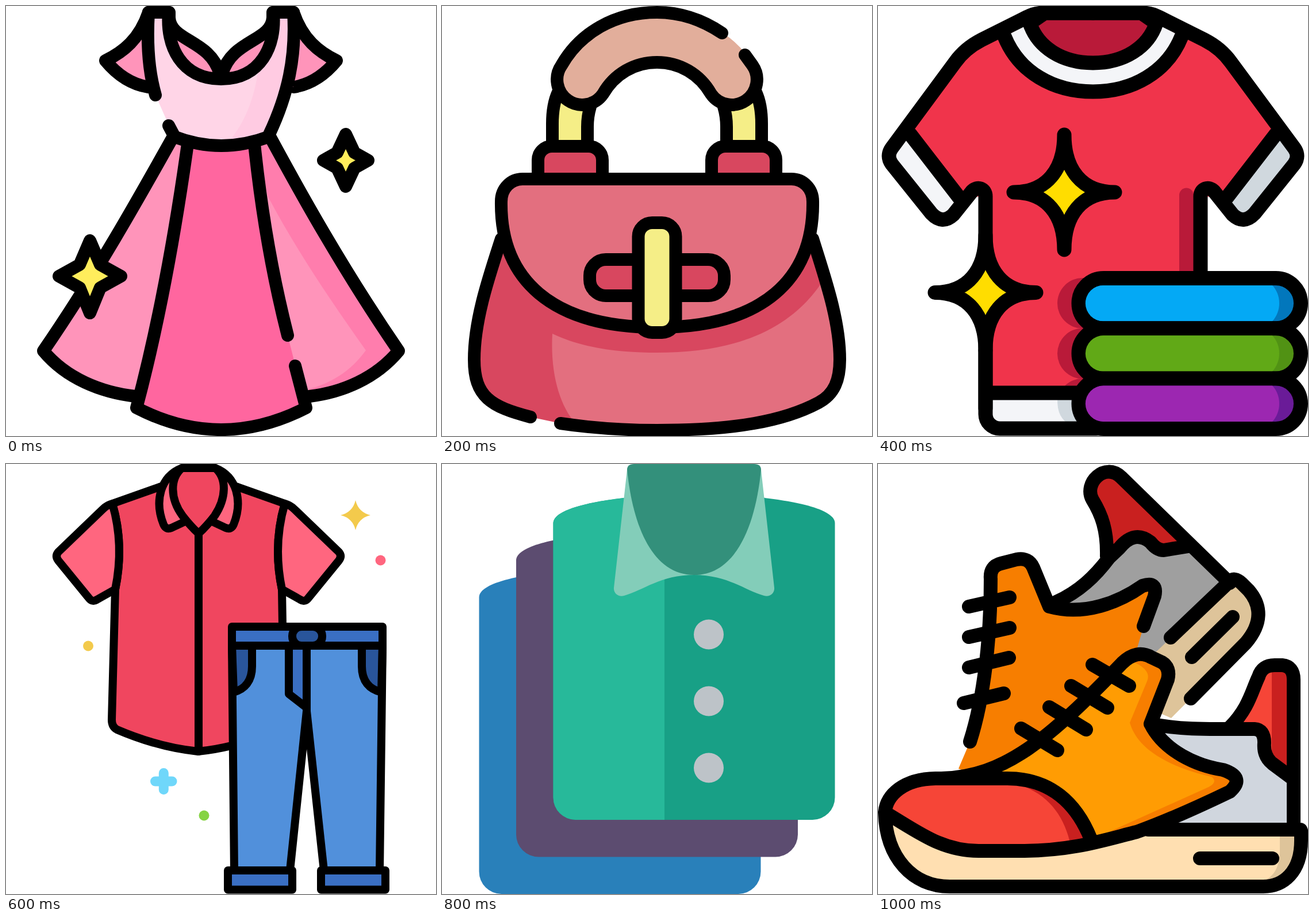
Animation of 748x748 px, one loop 1.2 s. Source, as an HTML page:

```html
<!DOCTYPE html>
<html lang="en">
<head>
<meta charset="utf-8">
<title>Wardrobe</title>
<style>
  html, body { margin: 0; width: 100%; height: 100%; overflow: hidden; background: #fff; }
  svg { display: block; width: 100vw; height: 100vh; fill: none; stroke: #000; stroke-linecap: round; stroke-linejoin: round; }
  .scene { display: none; }
  .flat { stroke: none; }
</style>
</head>
<body>
<svg viewBox="0 0 748 748">
  <!-- dress -->
  <g class="scene" stroke-width="22">
    <g class="flat">
      <path fill="#ff94ba" d="M292 225C236 325 161 460 65 600C105 648 165 672 225 679L316 240Z"/>
      <path fill="#ff7dad" d="M458 225C512 325 587 460 683 600C643 648 585 672 528 679L432 240Z"/>
      <path fill="#ff94ba" d="M432 240L456 332C505 425 570 520 626 599C600 635 565 657 524 667L494 600Z"/>
      <path fill="#ff669f" d="M316 240C295 390 268 545 227 699Q374 775 522 699L490 573C465 475 445 365 432 240Z"/>
      <path fill="#ffd5e7" d="M248 11C245 60 247 110 260 155L292 227Q374 259 458 227C490 155 505 90 500 11H465C470 70 443 127 374 127S278 70 283 11Z"/>
      <path fill="#ffcbe2" d="M439 110C432 160 417 200 388 236L458 227C490 155 505 90 500 11H465C468 55 455 90 439 110Z"/>
    </g>
    <g id="sleeve">
      <path fill="#ff94ba" d="M248 11C232 58 204 80 173 95C192 118 217 136 247 141"/>
      <path fill="#ff94ba" class="flat" d="M248 11V141L257 141C247 100 246 60 248 11ZM284 20C286 62 355 58 372 118L374 127C305 127 278 70 284 20Z"/>
      <path d="M248 11H284V20C286 62 355 58 372 118"/>
    </g>
    <use href="#sleeve" transform="matrix(-1 0 0 1 748 0)"/>
    <path d="M248 11C245 60 247 110 260 155M283 208L292 225M500 11C505 90 490 155 458 223
      M283 11C278 70 305 127 374 127S470 70 465 11M292 227Q374 259 458 227
      M292 225C236 325 161 460 65 600C105 648 165 672 225 679M458 225C512 325 587 460 683 600C643 648 585 672 528 679
      M316 240C295 390 268 545 227 699Q374 775 522 699L503 626M432 240C445 365 465 475 490 573"/>
    <path fill="#ffed5c" d="M146 408L164 450L200 470L164 490L146 534L128 490L92 470L128 450Z"/>
    <path fill="#ffed5c" d="M591 223L606 255L630 268.500L606 282L591 314L576 282L552 268.500L576 255Z"/>
  </g>

  <!-- handbag -->
  <g class="scene" stroke-width="22">
    <g class="flat">
      <path fill="#d8475f" d="M103 405C82 470 56 545 56 615C56 680 85 697 154 715L206 726C260 734 320 738 374 738C510 738 595 722 655 690C683 675 692 650 692 615C692 545 665 470 645 405Z"/>
      <path fill="#e36f7f" d="M192 570C250 598 320 603 374 603C500 603 600 570 660 482C680 540 692 580 692 615C692 650 683 675 655 690C595 722 510 738 374 738C320 738 275 734 232 726C205 695 188 640 192 570Z"/>
    </g>
    <path d="M103 405C82 470 56 545 56 615C56 680 85 697 154 715M206 726C260 734 320 738 374 738C510 738 595 722 655 690C683 675 692 650 692 615C692 545 665 470 645 405"/>
    <g id="post">
      <path class="flat" fill="#f5ee87" d="M192 244V205C192 183 195 165 202 150L258 175C255 185 253 195 253 210V244Z"/>
      <path d="M192 244V205C192 183 195 165 202 150M258 175C255 185 253 195 253 210V244"/>
      <path fill="#d8475f" d="M167 301V268a24 24 0 0 1 24-24H255a24 24 0 0 1 24 24V301"/>
    </g>
    <use href="#post" transform="matrix(-1 0 0 1 748 0)"/>
    <path class="flat" fill="#e2ae9b" d="M488 47C450 22 412 11 374 11C300 11 240 47 208 103A43 43 0 1 0 280 153C300 118 335 98 374 98S448 118 468 153A43 43 0 1 0 540 103L528 83Q511 61 488 47Z"/>
    <path d="M487 47C450 22 412 11 374 11C300 11 240 47 208 103A43 43 0 1 0 280 153C300 118 335 98 374 98S448 118 468 153A43 43 0 1 0 540 103L527 85"/>
    <path fill="#e36f7f" d="M140 301H608C628 301 645 317 645 340C647 475 558 559 374 559S101 475 103 340C103 317 120 301 140 301Z"/>
    <rect x="257" y="441" width="234" height="63" rx="28" fill="#d8475f"/>
    <rect x="341.500" y="377" width="65" height="191" rx="24" fill="#f5ee87"/>
  </g>

  <!-- folded laundry -->
  <g class="scene" stroke-width="25">
    <path class="flat" fill="#f0344b" d="M290 12H458L568 60L614 101L692 223L607 333L561 331V735H187V331L141 333L56 223L134 101L180 60Z"/>
    <g class="flat" fill="#b91a39">
      <path d="M524 480V329a12.500 12.500 0 0 1 25 0V480Z"/>
      <circle cx="356" cy="517" r="44"/><circle cx="356" cy="604.500" r="44"/><circle cx="356" cy="692" r="44"/>
    </g>
    <path class="flat" fill="#f4f5f8" d="M187 673H380V735H210Q187 735 187 712Z"/>
    <path class="flat" fill="#d0d8de" d="M313 673Q308 712 330 726H380V673Z"/>
    <path d="M187 673H380M187 600V710a25 25 0 0 0 25 25H380"/>
    <path class="flat" fill="#f4f5f8" d="M220 53C245 115 305 149 374 149S503 115 528 53L484 30H264Z"/>
    <path fill="#b91a39" d="M264 30C278 72 320 99 374 99S470 72 484 30L458 12H290Z"/>
    <path d="M220 53C245 115 305 149 374 149S503 115 528 53"/>
    <path fill="#f4f5f8" d="M56 223L24 247Q14 261 24 275L93 361Q112 381 131 363L141 333Z" class="flat"/>
    <path fill="#d0d8de" d="M692 223L724 247Q734 261 724 275L655 361Q636 381 617 363L607 333Z" class="flat"/>
    <path id="side" d="M374 12H290C270 12 262 18 250 24L180 59Q151 74 134 98L24 247Q14 261 24 275L93 361Q112 381 131 363L163 323C173 312 187 318 187 331V460M56 223L141 333"/>
    <use href="#side" transform="matrix(-1 0 0 1 748 0)"/>
    <path d="M187 460V700"/>
    <path id="spark" fill="#fd0" d="M324 224C324 285 355 324 412 324C355 324 324 363 324 424C324 363 293 324 236 324C293 324 324 285 324 224Z"/>
    <use href="#spark" x="-137" y="174.500"/>
    <g id="towels"></g>
  </g>

  <!-- shirt and jeans -->
  <g class="scene" stroke-width="14">
    <path fill="#f0465f" d="M185 69L267 40L335 20L403 40L485 69C470 120 470 170 480 218L484 470L392 490Q364 497 334 500C285 495 235 480 193 462Q184 457 184 445L190 218C200 170 200 120 185 69Z"/>
    <g id="arm">
      <path fill="#ff667f" d="M190 218L158 236Q150 241 144 233L91 168Q85 160 91 153L168 79Q176 71 185 69C200 120 200 170 190 218Z"/>
      <path fill="#ff667f" d="M306 7C268 22 258 65 274 105Q278 115 288 111L318 97L335 60Z"/>
    </g>
    <use href="#arm" transform="matrix(-1 0 0 1 670 0)"/>
    <path fill="#f0465f" d="M306 7H364C385 25 383 60 363 90Q350 107 335 121Q320 107 307 90C285 60 285 25 306 7Z"/>
    <path d="M335 120V500"/>
    <path class="flat" fill="#5190db" d="M393 283H655L650 720H553L523 440L494 720H397Z"/>
    <path fill="#29559b" d="M393 316H428V352C428 378 415 392 396 397ZM655 316H619V352C619 378 632 392 653 397Z"/>
    <path fill="#3a6fc3" d="M492 316V400L523 424V316Z"/>
    <path d="M393 316L397 707M655 316L650 707M523 316V430L494 707M523 430L553 707"/>
    <g fill="#3a6fc3">
      <path d="M393 283H655V316H393Z"/>
      <path d="M386 707H498V740.500H386ZM548 707H660V740.500H548Z"/>
    </g>
    <rect x="498" y="283" width="52" height="33" rx="16" fill="#29559b"/>
    <g class="flat" fill="#f3ca4c">
      <path d="M608 63Q613 84 634 89Q613 94 608 115Q603 94 582 89Q603 84 608 63Z"/>
      <circle cx="143" cy="316.500" r="9"/>
      <circle cx="651.500" cy="167.500" r="9" fill="#ff667f"/>
      <circle cx="344.500" cy="611.500" r="9" fill="#86d344"/>
    </g>
    <path stroke="#6fd7fa" stroke-width="17" d="M259.500 552H289M274.300 537.500V566.500"/>
  </g>

  <!-- stacked shirts -->
  <g class="scene flat">
    <defs>
      <path id="fold" d="M193.500 103C193.500 82 245 58 438.500 50C632 58 683.500 82 683.500 103V580a39 39 0 0 1-39 39H232.500a39 39 0 0 1-39-39Z"/>
      <clipPath id="half"><path d="M0 0H387V748H0Z"/></clipPath>
    </defs>
    <use href="#fold" x="-129" y="129" fill="#2980ba"/>
    <use href="#fold" x="-64.500" y="64.500" fill="#5c4c70"/>
    <use href="#fold" fill="#18a086"/>
    <g clip-path="url(#half)"><use href="#fold" fill="#27b99a"/></g>
    <path fill="#83cdb9" d="M322 10L299 215C298 225 307 232 317 229C350 220 380 193 438.500 193S527 220 560 229C570 232 579 225 578 215L555 10Z"/>
    <path fill="#33907b" d="M322 10Q322 0 334 0H543Q555 0 555 10C545 110 510 193 438.500 193S332 110 322 10Z"/>
    <g fill="#bdc3c8"><circle cx="464" cy="296.500" r="26"/><circle cx="464" cy="412.500" r="26"/><circle cx="464" cy="528.500" r="26"/></g>
  </g>

  <!-- sneakers -->
  <g class="scene" stroke-width="24">
    <g class="flat">
      <path fill="#9f9f9f" d="M310 240C350 222 378 195 402 163L440 130L545 141L612 207L500 320L440 345Z"/>
      <path fill="#c9201f" d="M398 160C399 115 389 88 373 62C357 33 395-4 423 23L540 143L497 150L474 136L440 128Z"/>
      <path fill="#dec49a" d="M470 340L612 204Q620 196 632 207C668 240 668 278 640 311L510 442L460 420Z"/>
      <path fill="#f77e00" d="M140 530L160 483C185 405 196 300 196 200Q196 178 214 173L245 165Q262 163 270 180L298 250C360 265 420 245 468 212L482 225L462 282L448 330L300 480L180 545Z"/>
    </g>
    <path d="M398 160C399 115 389 88 373 62C357 33 395-4 423 23L612 207M310 240C350 222 378 195 402 163L420 146Q446 114 474 136Q485 150 497 150L540 143
      M509 302L612 204Q620 196 632 207L645 220C668 247 668 278 640 311L544 408M546 336L617 266
      M160 483C185 405 196 300 196 200Q194 178 214 173L241 166Q262 162 270 180L298 248C360 265 420 240 460 212Q487 203 481 230L462 282
      M158 248L229 232M158 301L229 285M158 354L228 337M149 416L219 399"/>
    <g class="flat">
      <path fill="#f64537" d="M612 460C645 425 650 395 662 370Q668 350 690 350H723V560L672 510V461Z"/>
      <path fill="#c9201f" d="M685 350H723V560L685 520Z"/>
      <path fill="#d0d6de" d="M474 452C540 465 600 460 655 461Q672 462 672 485Q670 508 686 521L723 548V636H450Z"/>
      <path fill="#f77e00" d="M110 547C220 545 298 478 425 346Q450 322 475 336L494 345Q510 358 504 375L474 452C498 500 555 525 600 532Q640 545 612 570C520 610 450 630 375 652L225 547Z"/>
      <path fill="#ff9c03" d="M110 547C220 545 298 478 425 346L448 346Q476 360 468 378L438 450C455 510 540 535 580 544Q592 553 575 562L375 652L225 547Z"/>
      <path fill="#ffdfb1" d="M12 606C70 640 110 673 175 673H255C340 672 390 655 450 636H725Q737 636 736 655C736 710 705 735 670 735H125C60 735 14 685 12 606Z"/>
      <path fill="#dec49a" d="M699 636H725Q737 636 736 655C736 710 705 735 670 735V726C690 717 699 700 699 670Z"/>
      <path fill="#f64537" d="M12 606C15 575 45 548 100 547H225C300 547 345 590 370 652L255 673H175C110 673 70 640 12 606Z"/>
      <path fill="#c9201f" d="M235 555C296 570 324 613 335 662L370 652C345 590 300 550 235 555Z"/>
    </g>
    <path d="M612 458C645 425 650 395 662 370Q668 350 690 350H703Q723 352 723 375V636M474 452C540 465 600 460 655 461Q672 462 672 485Q670 508 686 521L721 547
      M110 547C220 545 298 478 425 346Q450 322 475 336L494 345Q509 354 504 375L474 452C498 500 555 525 600 532Q640 545 612 570C560 595 500 622 450 640C390 655 340 672 255 673H175C110 673 70 640 12 606
      C15 575 45 548 100 547H225C300 547 345 590 370 652M12 606C14 685 60 735 125 735H670C705 735 736 710 736 655V638M470 636H735M560 686H686
      M373 349L437 386M336 386L399 424M298 423L362 462M249 460L312 498"/>
  </g>
</svg>
<script>
  const towels = [["#04a9f5", "#0277bc"], ["#61a917", "#519214"], ["#9c27b1", "#6a1b98"]];
  document.getElementById("towels").innerHTML = towels.map(([light, dark], i) => `
    <g transform="translate(0 ${i * 87.3})">
      <rect x="349" y="473.5" width="386.500" height="87.3" rx="43.6" fill="${dark}"/>
      <path class="flat" fill="${light}" d="M392 486H686C702 503 702 531 686 548.300H392a31.150 31.150 0 0 1 0-62.300Z"/>
    </g>`).join("");

  const scenes = document.querySelectorAll(".scene");
  const HOLD = 200;

  function draw(now) {
    const current = Math.floor(now / HOLD) % scenes.length;
    scenes.forEach((scene, i) => scene.style.display = i === current ? "inline" : "none");
    requestAnimationFrame(draw);
  }
  draw(performance.now());
</script>
</body>
</html>
```
